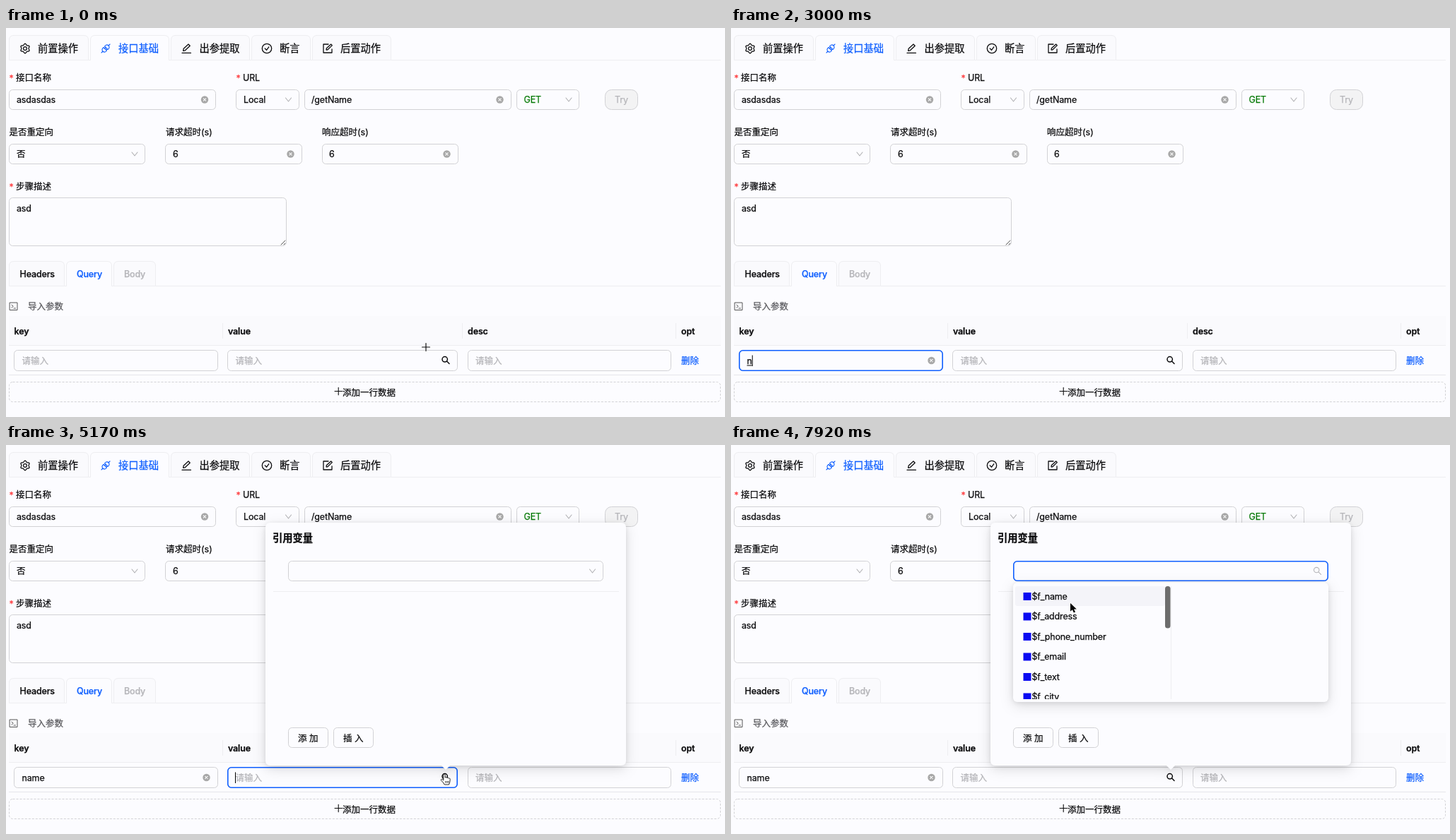
Write an HTML page that moves like this. It is 1017 by 551 pixels and loops after 8 s.

```html
<!DOCTYPE html>
<html lang="zh-CN">
<head>
<meta charset="utf-8">
<style>
html, body { margin: 0; width: 100%; height: 100%; overflow: hidden; background: #fcfcff; }
svg { display: block; font: 12.5px Inter, "Noto Sans CJK SC", "Noto Sans CJK", sans-serif; color: #0c0c0e; }
text { white-space: pre; fill: currentColor; stroke: currentColor; stroke-width: .25; }
.latin { letter-spacing: -.15px; }
.ico { fill: none; stroke: #0c0c0e; stroke-width: 1.3; stroke-linejoin: round; stroke-linecap: round; }
</style>
</head>
<body>
<svg id="stage" width="1017" height="551" viewBox="0 0 1017 551"></svg>
<script>
const BLUE = '#0f5fff', BORDER = '#d2d2d5', FAINT = '#eeeef1', PALE = '#b5b5b9', PAGE = '#fcfcff';

const text = (x, cy, s, attrs = '') =>
  `<text x="${x}" y="${cy + 4.5}" ${/^[ -~]*$/.test(s) ? 'class="latin"' : ''} ${attrs}>${s}</text>`;
const ink = c => `color="${c}"`;
const box = (x1, y1, x2, y2, attrs = '') =>
  `<rect x="${x1 + .5}" y="${y1 + .5}" width="${x2 - x1 - 1}" height="${y2 - y1 - 1}" rx="5" fill="${PAGE}" stroke="${BORDER}" ${attrs}/>`;
const path = (d, style = '') => `<path class="ico" d="${d}" style="${style}"/>`;
const line = (d, color = FAINT) => `<path d="${d}" fill="none" stroke="${color}"/>`;
const at = (x, y, s) => `<g transform="translate(${x} ${y})">${s}</g>`;
const group = (id, s) => `<g id="${id}">${s}</g>`;

const clear = (x, y) => `<circle cx="${x}" cy="${y}" r="5.2" fill="#a8a8a8"/>` +
  path(`M${x - 1.7} ${y - 1.7}l3.4 3.4m0-3.4l-3.4 3.4`, 'stroke:#fff;stroke-width:1.1');
const arrowDown = (x, y) => path(`M${x - 4} ${y - 2.5}l4 5 4-5`, 'stroke:#b0b0b4;stroke-width:1.1');
const search = (x, y, style) => path(`M${x + 5} ${y + 5}l-3.7-3.7M${x + 2.4} ${y - 1.2}a3.7 3.7 0 1 1-7.4 0a3.7 3.7 0 1 1 7.4 0`, style);
const focus = (id, x1, y1, x2, y2) =>
  group(id, box(x1 + .3, y1 + .3, x2 - .3, y2 - .3, `style="stroke:${BLUE};stroke-width:1.6"`));
const caret = (id, x, y) => `<rect id="${id}" x="${x}" y="${y}" width="1" height="15.5"/>`;
const label = (x, y, s, must) => (must ? text(x, y + 1, '*', ink('#ff3d40')) : '') + text(x + (must ? 9.5 : 0), y, s);

function tab(x1, x2, top, bottom, active) {
  const shape = `M${x1 + .5} ${bottom + .5}V${top + 7}q0-6.5 6.5-6.5H${x2 - 7}q6.5 0 6.5 6.5V${bottom + .5}`;
  return `<path d="${shape}" fill="${active ? PAGE : '#fafafd'}" stroke="${FAINT}"/>` +
    line(`M${x1 + 1} ${bottom + .5}H${x2 - 1}`, active ? PAGE : FAINT);
}

function gear() {
  let d = '';
  for (let i = 0; i < 36; i++) {
    const a = i * Math.PI / 18, r = 5.9 + .9 * Math.cos(6 * a);
    d += `${i ? 'L' : 'M'}${(r * Math.sin(a)).toFixed(2)} ${(-r * Math.cos(a)).toFixed(2)}`;
  }
  return path(d + 'ZM2.4 0a2.4 2.4 0 1 1-4.8 0a2.4 2.4 0 1 1 4.8 0');
}
const plug = path('M-6 6l2-2M4-4l2-2M-4 4c-2-2-1-4 1-5.5l4.5 4.5c-1.5 2-3.5 3-5.5 1ZM4-4c2 2 1 4-1 5.5L-1.5-3C0-5 2-6 4-4ZM-1.5 0l1.5-1.5M.7 2.2L2.2 .7',
  `stroke:${BLUE};stroke-width:1.1`);
const pen = path('M-6 6.3H6.5M-4.3 3.3l.5-3L3-6 5.2-3.8-1.6 2.8Z');
const check = path('M6.7 0a6.7 6.7 0 1 1-13.4 0a6.7 6.7 0 1 1 13.4 0M-2.7 0l2.2 2.4 3.3-4.6');
const form = path('M6 1V6H-6V-6H1M-2 2l.3-2.2L4.7-6 6.3-4.4 0 1.8Z');

const tabs = [[4, 117, gear(), 27, 45, '前置操作'], [119, 231, plug, 141, 159, '接口基础'], [233, 345, pen, 255, 273.5, '出参提取'],
  [347, 431, check, 369, 387, '断言'], [433, 545, form, 455, 473, '后置动作']];
const subTabs = [[4, 83, 19.5, 'Headers', '#0c0c0e'], [85, 150, 100, 'Query', BLUE], [152, 212, 167, 'Body', PALE]];

const details =
  line('M4 45.5H1011') +
  tabs.map(([a, b, icon, ix, tx, s], i) => tab(a, b, 10, 45, i == 1) + at(ix, 29, icon) +
    text(tx, 29.5, s, `font-size="14.25" font-weight="500" ${i == 1 ? ink(BLUE) : ''}`)).join('') +
  label(4.5, 70.5, '接口名称', 1) + label(325.5, 70.5, 'URL', 1) +
  box(4, 87, 297, 116) + text(15, 101.5, 'asdasdas') + clear(281, 101.5) +
  box(325, 87, 415, 116) + text(336, 101.5, 'Local') + arrowDown(399.5, 101.5) +
  box(422, 87, 715, 116) + text(432, 101.5, '/getName') + clear(698.5, 101.5) +
  box(722, 87, 811, 116) + text(732.5, 101.5, 'GET', ink('#067a06')) + arrowDown(796, 101.5) +
  box(847, 87, 894, 116, 'style="rx:9px;fill:#f3f3f4"') + text(861, 101.5, 'Try', ink(PALE)) +
  label(4.5, 147.5, '是否重定向') + label(226, 147.5, '请求超时(s)') + label(447, 147.5, '响应超时(s)') +
  box(4, 164, 197, 193) + text(15, 178.5, '否') + arrowDown(182, 178.5) +
  box(225, 164, 419, 193) + text(236, 178.5, '6') + clear(402.5, 178.5) +
  box(447, 164, 640, 193) + text(457, 178.5, '6') + clear(623.5, 178.5) +
  label(4.5, 224, '步骤描述', 1) + box(4, 240, 397, 309) + text(15, 255, 'asd') +
  path('M389 307l6-6M393 307l2-2', 'stroke:#444;stroke-width:.9') +
  line('M4 365.5H1011') +
  subTabs.map(([a, b, x, s, c], i) => tab(a, b, 330, 365, i == 1) + text(x, 348, s, `font-weight="500" ${ink(c)}`)).join('') +
  path('M5.5 389h10.5v10.5H5.5ZM8 392l2.2 2.2L8 396.4M11 397h2.6', 'stroke:#555;stroke-width:1') +
  text(31, 394, '导入参数', ink('#58585c'));

const table =
  '<rect x="4" y="408" width="1007" height="42" fill="#fafafd"/>' +
  [[11.5, 'key'], [314, 'value'], [653, 'desc'], [955, 'opt']].map(([x, s]) => text(x, 429, s, 'font-weight="600"')).join('') +
  line('M306.5 418V440M645.5 418V440M947.5 418V440M4 449.5H1011') + line('M4 491.5H1011', '#e6e6ea') +
  box(11, 456, 300, 486) + focus('keyFocus', 11, 456, 300, 486) +
  box(313, 456, 639, 486) + focus('valueFocus', 313, 456, 639, 486) +
  box(653, 456, 941, 486) +
  text(22.5, 471, '请输入', `id="keyHint" ${ink(PALE)}`) +
  text(324.5, 471, '请输入', ink(PALE)) + text(664, 471, '请输入', ink(PALE)) +
  text(22.5, 471, '', 'id="keyText"') + group('keyClear', clear(283.5, 471)) +
  '<rect id="underline" x="22.5" y="477.5" height="1"/>' +
  caret('keyCaret', 23, 463.5) + caret('valueCaret', 324, 463.5) +
  search(622, 470.5, 'stroke-width:1.5') + text(955, 471, '删除', ink(BLUE)) +
  box(4, 501, 1011, 530, 'stroke-dasharray="3 2"') +
  path('M465 514.5h10.5M470.2 509.2v10.5', 'stroke-width:1.1') + text(476, 516, '添加一行数据');

const shadow = 'style="filter:drop-shadow(0 5px 9px rgba(0,0,0,.13)) drop-shadow(0 1px 3px rgba(0,0,0,.09))"';
const names = ['name', 'address', 'phone_number', 'email', 'text', 'city'];
const menu =
  `<rect x="399" y="195" width="446" height="169" rx="6" fill="${PAGE}" ${shadow}/>` +
  '<rect id="hover" x="402" y="200" width="212" height="28" rx="3" fill="#f4f4f9"/>' +
  line('M622.5 200V360') + '<rect x="614" y="200" width="7.5" height="59.5" rx="3.5" fill="#6c6c6c"/>' +
  '<g clip-path="url(#list)">' + names.map((s, i) => {
    const y = 214 + 28.5 * i;
    return `<rect x="413.5" y="${y - 5}" width="11" height="11" fill="#0b0bf2"/>` + text(425.5, y, '$f_' + s);
  }).join('') + '</g>';

const popover =
  `<path d="M374 110H870q7 0 7 7V447q0 7-7 7H628l-6 6-6-6H374q-7 0-7-7V117q0-7 7-7Z" fill="${PAGE}" ${shadow}/>` +
  text(377, 132.5, '引用变量', 'font-size="14.25" font-weight="600"') +
  line('M378 207.5H867') +
  box(399, 164, 845, 193) + focus('selectFocus', 399, 164, 845, 193) +
  group('selectDown', arrowDown(829.5, 178.5)) + group('selectSearch', search(829.5, 178.3, 'stroke:#b4b4b8;stroke-width:1.1')) +
  caret('selectCaret', 410, 171) +
  box(399, 400, 456, 429) + text(413, 415, '添 加') + box(463, 400, 520, 429) + text(477, 415, '插 入') +
  group('menu', menu);

const pointers =
  group('cross', path('M-6 0H6M0-6V6', 'stroke:#fff;stroke-width:2.6') + path('M-5.5 0H5.5M0-5.5V5.5', 'stroke-width:1.2')) +
  group('arrow', '<path d="M0 0V11.8L2.8 9.2 4.8 13.6 7 12.6 5 8.4H8.8Z" fill="#000" stroke="#fff" stroke-width="1.1" paint-order="stroke"/>') +
  group('hand', '<path d="M-1 9V1.2C-1-.3 1.3-.3 1.4 1.2V5.2C2.4 4 3.8 4.4 4 5.6 4.8 4.8 6.1 5.1 6.3 6.2 7.3 5.6 8.5 6.2 8.4 7.6L8 11.3 6.7 15H.4L-1.5 12-4.5 8.8C-4.7 7.2-3.2 6.7-1 9ZM2 10v2.6M4.1 10v2.6M6.1 10v2.6" fill="#fff" stroke="#111" stroke-width=".9" stroke-linejoin="round"/>');

const stage = document.getElementById('stage');
stage.innerHTML = '<clipPath id="list"><rect x="399" y="198" width="446" height="162"/></clipPath>' +
  details + table + group('popover', popover) + group('pointer', pointers);

const el = id => document.getElementById(id);
const show = (id, on) => el(id).style.display = on ? '' : 'none';
const within = (t, a, b) => t >= a && t < b;

// time, x, y, pointer shape from that time on
const track = [
  [0, 594, 452, 'cross'], [250, 649, 464, 'cross'], [333, 633, 461, 'cross'], [500, 625, 459, 'hand'],
  [833, 625, 459, 'arrow'], [1167, 520, 512, 'arrow'], [1417, 460, 485, 'arrow'], [1667, 474, 533, 'arrow'],
  [2000, 250, 510, 'arrow'], [2250, 150, 470, 'arrow'], [2417, 142, 467, 'arrow'], [2917, 142, 467, ''],
  [3583, 142, 467, 'arrow'], [3833, 420, 470, 'arrow'], [4000, 570, 440, 'arrow'], [4167, 570, 440, 'arrow'],
  [4333, 598, 462.5, 'arrow'], [4667, 621, 466, 'hand'], [5500, 619, 466, 'arrow'], [5583, 619, 466, 'arrow'],
  [6000, 537.5, 198.5, 'arrow'], [6333, 530, 180, 'arrow'], [6583, 530, 180, 'arrow'], [6833, 481, 223.5, 'hand'],
  [6917, 480, 225, 'hand'], [7083, 480, 225, 'arrow'], [7250, 480, 225, 'hand'], [7583, 480, 225, 'arrow'],
  [7750, 480, 224, 'hand'], [7917, 480, 224, 'arrow'], [8000, 480, 224, 'arrow']
];

function movePointer(t) {
  const i = track.findLastIndex(k => k[0] <= t + 1);
  const a = track[i], b = track[i + 1] || a;
  const p = b == a ? 0 : (t - a[0]) / (b[0] - a[0]);
  const x = a[1] + (b[1] - a[1]) * p, y = a[2] + (b[2] - a[2]) * p;
  el('pointer').setAttribute('transform', `translate(${x} ${y})`);
  for (const id of ['cross', 'arrow', 'hand']) show(id, id == a[3]);
  show('hover', y > 190);
}

function draw(now) {
  // the screen updates twelve times a second
  const t = Math.floor((now % 8000 + 4) * .012) / .012;
  movePointer(t);

  const typed = 'name'.slice(0, [2910, 3080, 3160, 3245].filter(k => t >= k).length);
  el('keyText').textContent = typed;
  const width = typed ? el('keyText').getComputedTextLength() : 0;
  show('keyHint', !typed);
  show('keyClear', typed);
  show('keyFocus', within(t, 2245, 3830));
  show('keyCaret', within(t, 2245, 2745) || within(t, 2910, 3830));
  el('keyCaret').setAttribute('x', 22.5 + width);
  show('underline', within(t, 2910, 3580));
  el('underline').setAttribute('width', width);

  show('valueFocus', within(t, 3830, 6495));
  show('valueCaret', within(t, 3830, 6330) && (t - 3830) % 1000 < 500);

  show('popover', t >= 5160);
  const open = t >= 6495;
  show('menu', open);
  show('selectFocus', t >= 6410);
  show('selectDown', !open);
  show('selectSearch', open);
  show('selectCaret', within(t, 6410, 6745) || within(t, 7245, 7745));
}

const start = performance.now();
(function loop() {
  draw(performance.now() - start);
  requestAnimationFrame(loop);
})();
</script>
</body>
</html>
```
